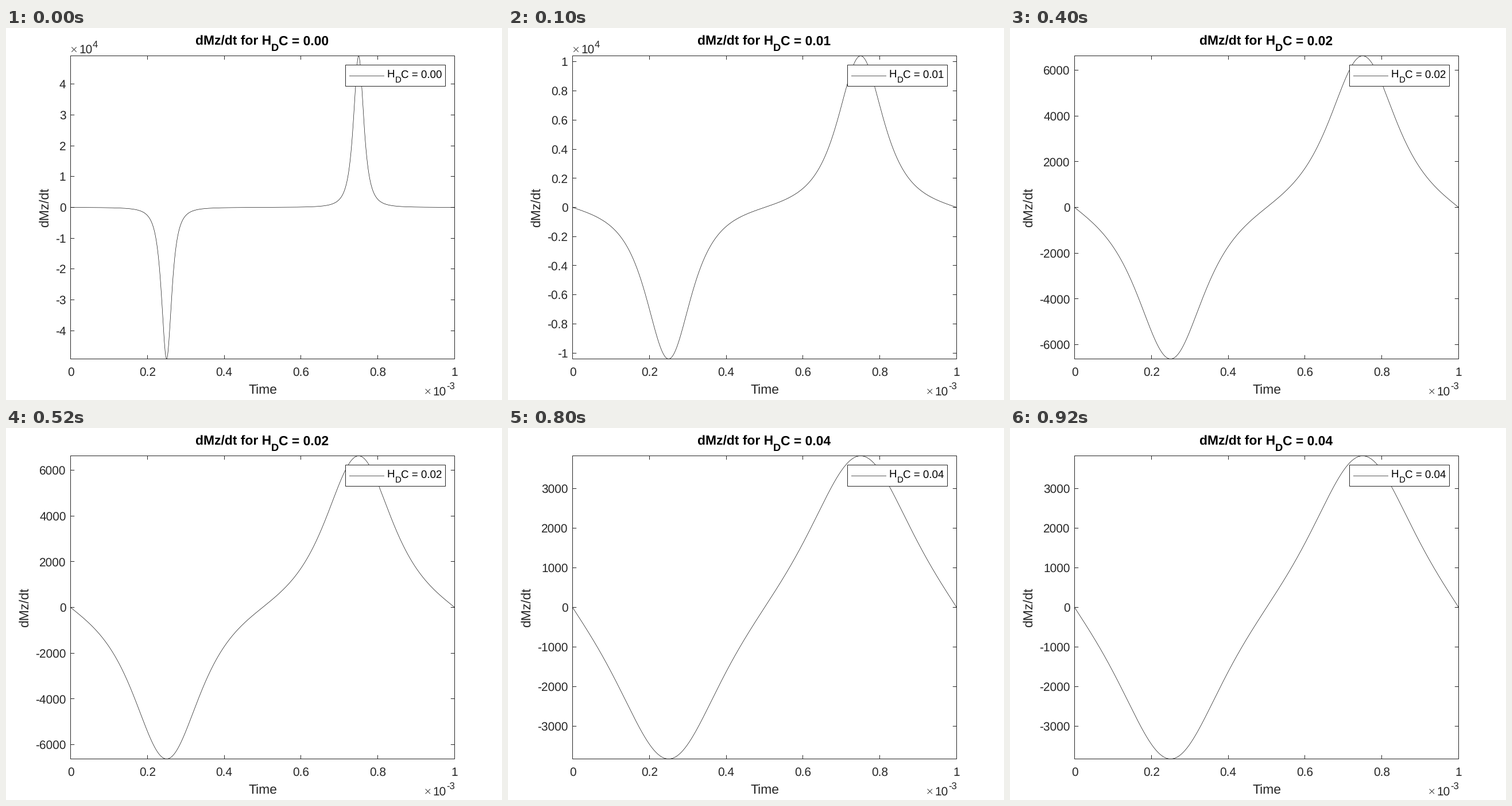
Write a matplotlib script that moves like this. It is 864x648 px and loops after 1 s.

```python
import math

import numpy as np
import matplotlib.pyplot as plt
from matplotlib.animation import FuncAnimation

plt.rcParams["font.family"] = "Liberation Sans"
plt.rcParams["text.hinting"] = "none"
# Edges are already placed on pixel centres.
plt.rcParams["path.snap"] = False

WIDTH, HEIGHT = 864, 648
LEFT, RIGHT, TOP, BOTTOM = 112.5, 781.5, 48.5, 576.5
MID_X, ZERO_Y = (LEFT + RIGHT) / 2, (TOP + BOTTOM) / 2
TICK = 6.7
GREY = "#262626"
CURVE_STYLE = dict(color="black", width=0.65)
TICK_SIZE, LABEL_SIZE, LEGEND_SIZE = 20.83, 22.92, 18.75
SCRIPT = 0.8

# peak value, tick step, exponent of the axis, baseline of the y label
CASES = [
    (49120, 10000, 4, 74),
    (10414, 2000, 4, 56),
    (6628, 2000, 0, 39),
    (4866, 1000, 0, 39),
    (3826, 1000, 0, 39),
]
SCHEDULE = [0, 1, 1, 1, 2, 2, 3, 3, 4, 4]

# One pixel per point, so sizes and widths are given in pixels.
fig = plt.figure(figsize=(WIDTH / 72, HEIGHT / 72), dpi=72, facecolor="white")
ax = fig.add_axes([0, 0, 1, 1])


def centre(v):
    """Centre of the pixel that holds v."""
    return math.floor(v) + 0.5


def line(xs, ys, color=GREY, width=1.0, **kw):
    ax.plot(xs, ys, color=color, lw=width, solid_capstyle="butt", **kw)


def box(x0, y0, x1, y1, fill, z):
    ax.add_patch(plt.Rectangle((x0, y0), x1 - x0, y1 - y0, facecolor=fill,
                               edgecolor=GREY, lw=1, zorder=z))


def text(x, y, s, size, color=GREY, ha="left", **kw):
    ax.text(x, y, s, fontsize=size, color=color, ha=ha, va="baseline",
            zorder=6, **kw)


def field_label(head, value, xs, y, drop, size, **kw):
    """Text with a lowered D between its head and its value."""
    text(xs[0], y, head, size, "black", **kw)
    text(xs[1], y + drop, "D", size * SCRIPT, "black", **kw)
    text(xs[2], y, f"C = {value:.2f}", size, "black", **kw)


def power(x, y, exponent):
    """Times sign, 10 and a raised exponent; x is the left of the 10."""
    cx, cy, r = x - 9, y - 6.5, 4.2
    for sign in (-1, 1):
        line([cx - r, cx + r], [cy - sign * r, cy + sign * r], width=0.9)
    text(x, y, "10", TICK_SIZE)
    text(x + 23.2, y - 10, str(exponent), TICK_SIZE * SCRIPT)


def draw_curve(peak):
    # Slope of cos / sqrt(cos^2 + a^2) over one period of 1 ms.
    t = np.linspace(0, 1, 1001)
    phase = 2 * np.pi * t
    a2 = (2000 * np.pi / peak) ** 2
    slope = -np.sin(phase) * (a2 / (np.cos(phase) ** 2 + a2)) ** 1.5
    line(LEFT + t * (RIGHT - LEFT), ZERO_Y - slope * (BOTTOM - ZERO_Y),
         zorder=3, **CURVE_STYLE)


def draw_axes(peak, step, exponent, label_x):
    box(LEFT, TOP, RIGHT, BOTTOM, "none", 2)
    for i in range(6):
        x = LEFT + i * (RIGHT - LEFT) / 5
        for edge, inner in ((BOTTOM, BOTTOM - TICK), (TOP, TOP + TICK)):
            line([centre(x)] * 2, [edge, inner])
        text(x, 606, f"{i / 5:g}", TICK_SIZE, ha="center")

    count = int(peak // step)
    for i in range(-count, count + 1):
        y = ZERO_Y - i * step / peak * (BOTTOM - ZERO_Y)
        for edge, inner in ((LEFT, LEFT + TICK), (RIGHT, RIGHT - TICK)):
            line([edge, inner], [centre(y)] * 2)
        text(104.5, y + 7.5, f"{i * step / 10 ** exponent:g}", TICK_SIZE,
             ha="right")

    if exponent:
        power(127.5, 44, exponent)
    power(743.8, 639.5, -3)
    text(MID_X, 636.5, "Time", LABEL_SIZE, ha="center")
    text(label_x, ZERO_Y, "dMz/dt", LABEL_SIZE, ha="center",
         rotation=90, rotation_mode="anchor")


def draw_legend(field):
    box(591.5, 64.5, 765.5, 101.5, "white", 4)
    line([598, 659], [83.5, 83.5], zorder=5, **CURVE_STYLE)
    field_label("H", field, (663.8, 677.3, 688.1), 86.5, 8.5, LEGEND_SIZE)


def draw(frame):
    case = SCHEDULE[frame]
    ax.clear()
    ax.set_xlim(0, WIDTH)
    ax.set_ylim(HEIGHT, 0)
    ax.axis("off")
    draw_axes(*CASES[case])
    draw_curve(CASES[case][0])
    draw_legend(case / 100)
    field_label("dMz/dt for H", case / 100, (330, 462, 475), 29.5, 11,
                LABEL_SIZE, weight="bold")
    return ax.get_children()


anim = FuncAnimation(fig, draw, frames=len(SCHEDULE), interval=100,
                     init_func=lambda: [], repeat=True, repeat_delay=0)
plt.show()
```
